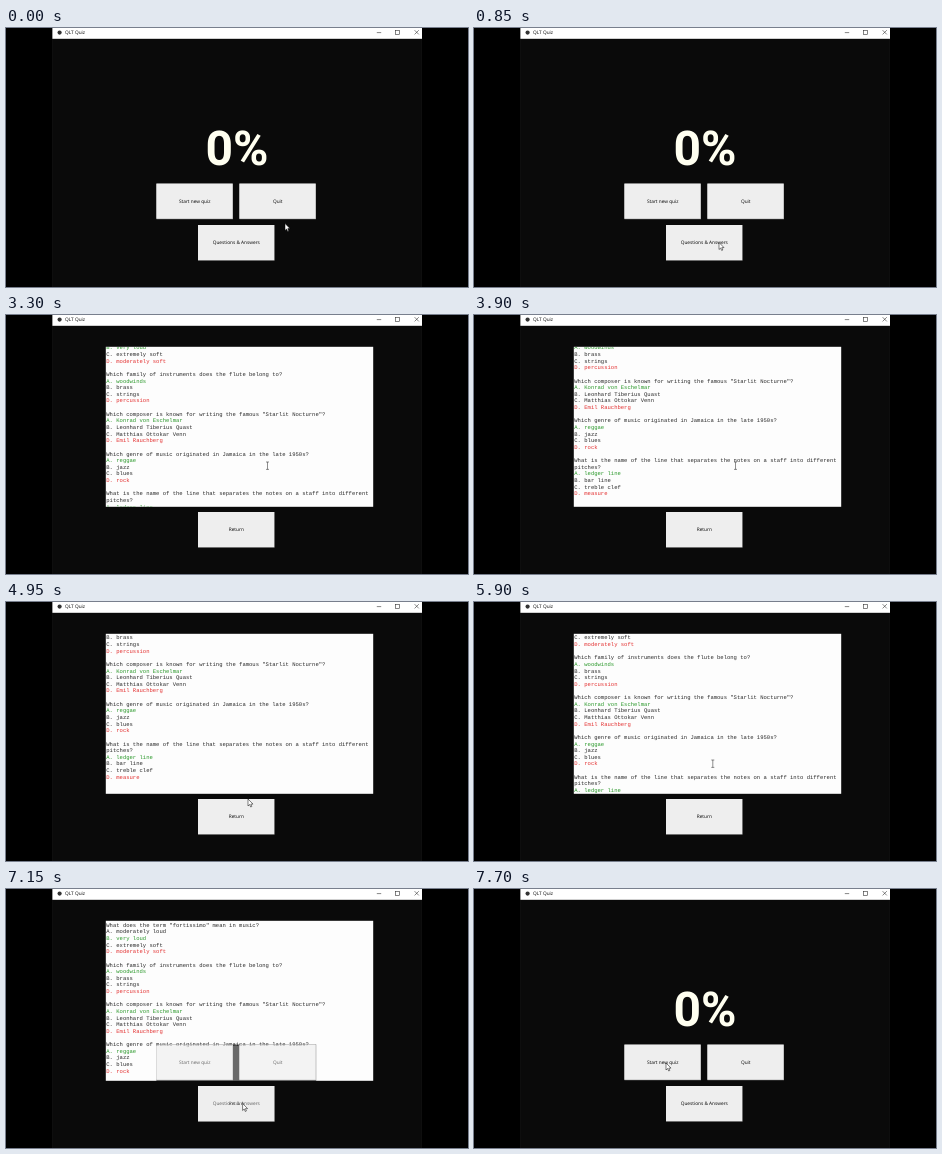
An HTML page that plays this animation: 462 px wide and 259 px high, repeating every 8000 ms.

```html
<!DOCTYPE html>
<html lang="en">
<head>
<meta charset="utf-8">
<title>Quiz</title>
<style>
  html, body { margin: 0; width: 100%; height: 100%; overflow: hidden; background: #000; }
  svg { display: block; width: 462px; height: 259px; }
  text { text-rendering: geometricPrecision; white-space: pre; }
  .ui { font: 4.75px "Open Sans", "Noto Sans", sans-serif; fill: #000; }
  .mid { text-anchor: middle; }
  .score { font: bold 48px Roboto, "Noto Sans", sans-serif; fill: #fffff0; }
  .mono { font: 5.54px "Liberation Mono", "Courier New", monospace; }
  .ask { fill: #2a2a2a; }
  .right { fill: #2a982a; }
  .wrong { fill: #e33030; }
</style>
</head>
<body>
<svg viewBox="0 0 462 259">
  <defs>
    <clipPath id="page"><rect x="100" y="32" width="267" height="159.6"/></clipPath>
  </defs>
  <rect width="462" height="259"/>
  <rect x="46" width="370" height="259" fill="#111"/>
  <rect x="46.6" width="368.8" height="259" fill="#0a0a0a"/>
  <rect x="46.4" width="369.6" height="10.8" fill="#fff"/>
  <circle cx="53.6" cy="4.6" r="2.1" fill="#333"/>
  <text class="ui" x="59" y="6.2">QLT Quiz</text>
  <g fill="none" stroke="#333" stroke-width=".6">
    <path d="M370.8 4.6h4.4M408.6 2.2l4.2 4.2M412.8 2.2l-4.2 4.2"/>
    <rect x="389.6" y="2.3" width="4" height="4"/>
  </g>
  <g id="list">
    <rect x="99.8" y="31.8" width="267.4" height="160" fill="#fdfdfd"/>
    <g clip-path="url(#page)"><g id="lines"></g></g>
  </g>
  <g id="home">
    <rect x="150.4" y="155.4" width="159.8" height="36.6" fill="#0a0a0a"/>
    <text id="score" class="score mid" x="231" y="137.3">0%</text>
  </g>
  <path id="arrow" d="M0 0V7L1.6 5.5L2.7 8L3.8 7.5L2.8 5.1H5Z" fill="#fff" stroke="#000" stroke-width=".5"/>
  <path id="beam" d="M-1.5 -3.7H1.5M0 -3.7V3.7M-1.5 3.7H1.5" fill="none" stroke="#333" stroke-width=".55"/>
</svg>
<script>
const LOOP = 8000, TICK = 50, LINE = 6.63, NOTCH = 16.6, END = 53.4;
const SHOW_LIST = 1000, SHOW_HOME = 7200, BLEND = SHOW_HOME - TICK;
const $ = id => document.getElementById(id);
const clamp = (v, lo, hi) => Math.min(hi, Math.max(lo, v));

function add(parent, tag, attrs, label) {
  const el = document.createElementNS("http://www.w3.org/2000/svg", tag);
  for (const key in attrs) el.setAttribute(key, attrs[key]);
  if (label) el.textContent = label;
  parent.appendChild(el);
}

function button(parent, x, y, label) {
  const width = 76.6, height = 35.6;
  add(parent, "rect", { x, y, width, height, fill: "#999" });
  add(parent, "rect", { x, y, width: width - .5, height: height - .5, fill: "#eee" });
  add(parent, "text", { class: "ui mid", x: x + width / 2, y: y + 19.1 }, label);
}

button($("home"), 150.4, 155.6, "Start new quiz");
button($("home"), 233.4, 155.6, "Quit");
button($("home"), 192, 197, "Questions & Answers");
button($("list"), 192, 197, "Return");

// Question, answers; an asterisk marks the right one
const quiz = `What does the term "fortissimo" mean in music?
A. moderately loud
*B. very loud
C. extremely soft
D. moderately soft

Which family of instruments does the flute belong to?
*A. woodwinds
B. brass
C. strings
D. percussion

Which composer is known for writing the famous "Starlit Nocturne"?
*A. Konrad von Eschelmar
B. Leonhard Tiberius Quast
C. Matthias Ottokar Venn
D. Emil Rauchberg

Which genre of music originated in Jamaica in the late 1950s?
*A. reggae
B. jazz
C. blues
D. rock

What is the name of the line that separates the notes on a staff into different
pitches?
*A. ledger line
B. bar line
C. treble clef
D. measure`;

quiz.split("\n").forEach((line, row) => {
  const kind = line[0] === "*" ? "right" : line.startsWith("D.") ? "wrong" : "ask";
  add($("lines"), "text", { class: "mono " + kind, x: 100.3, y: 37.8 + LINE * row },
    line.replace("*", ""));
});

const start = { x: 279, y: 195.5 };
const moves = [
  { at: 350, ms: 500, x: 245, y: 214.5 },
  { at: 1850, ms: 600, x: 261.5, y: 150.7 },
  { at: 4650, ms: 300, x: 242, y: 197 },
  { at: 4950, ms: 550, x: 238.8, y: 161.7 },
  { at: 6350, ms: 500, x: 236.6, y: 214.5 },
  { at: 7350, ms: 350, x: 192, y: 174 }
];

function pointer(t) {
  return moves.reduce((p, m) => {
    const k = clamp((t - m.at) / m.ms, 0, 1), ease = k * k * (3 - 2 * k);
    return { x: p.x + (m.x - p.x) * ease, y: p.y + (m.y - p.y) * ease };
  }, start);
}

// Wheel clicks move one notch each, limited by the ends of the page
const wheelDown = [2500, 3450, 3650, 4000], wheelUp = [5600, 5800, 6000, 6200];
const clicks = (times, t) => times.filter(at => at <= t).length;

function offset(t) {
  const down = Math.min(END, NOTCH * clicks(wheelDown, t));
  return Math.max(0, down - NOTCH * clicks(wheelUp, t));
}

const show = (id, on) => { $(id).style.display = on ? "" : "none"; };
const place = (id, x, y) => $(id).setAttribute("transform", `translate(${x} ${y})`);

function draw(now) {
  const t = Math.floor(now % LOOP / TICK) * TICK;
  const listed = t >= SHOW_LIST && t < SHOW_HOME;
  const blend = t === BLEND;
  show("list", listed);
  show("home", !listed || blend);
  show("score", !blend);
  $("home").setAttribute("opacity", blend ? .6 : 1);
  place("lines", 0, -offset(t));

  const { x, y } = pointer(t);
  const overText = listed && y < 192;
  show("beam", overText);
  show("arrow", !overText);
  place(overText ? "beam" : "arrow", x, y);
}

function loop() {
  draw(performance.now());
  requestAnimationFrame(loop);
}
loop();
</script>
</body>
</html>
```
